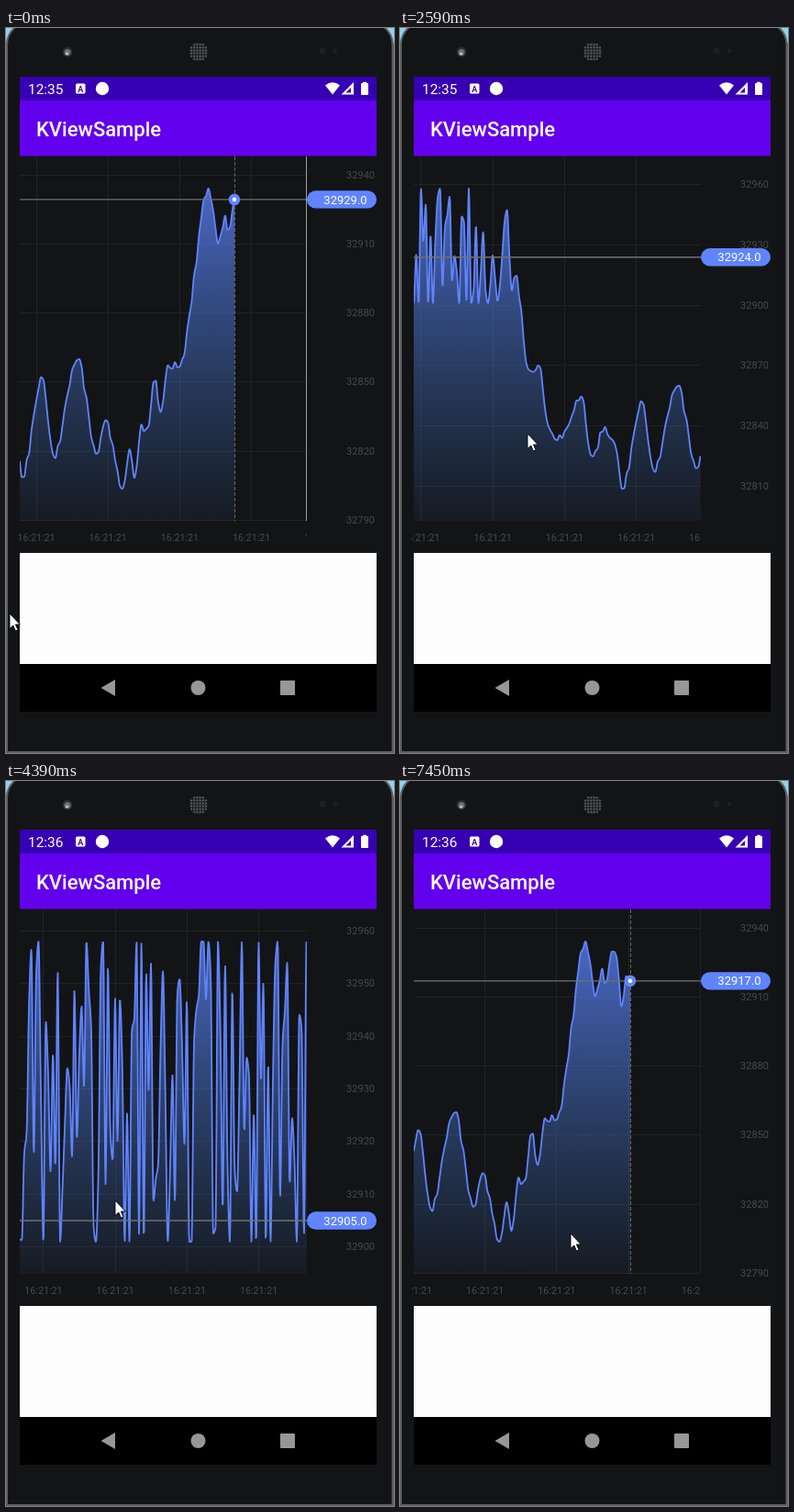
An HTML page with a canvas for the animation above (8 s loop, 423 px wide and 790 px high).

```html
<!DOCTYPE html>
<html lang="en">
<head>
<meta charset="utf-8">
<title>KViewSample</title>
<style>
  html, body { margin: 0; width: 100%; height: 100%; overflow: hidden; background: #131416; }
  canvas { display: block; }
</style>
</head>
<body>
<canvas id="stage" width="423" height="790"></canvas>
<script>
const ctx = document.getElementById('stage').getContext('2d');
const LOOP = 8000;
const BASE = 32800;
const STEP = 2.607;
const LABEL_GAP = 30 * STEP;
const LABEL_X = 33;
const plot = { left: 15, right: 328, top: 140, bottom: 537, pad: 35 };
const BLUE = '#6084ff';
const BODY = '#131416';

const clamp = (v, lo, hi) => Math.min(hi, Math.max(lo, v));
const smooth = (s) => s * s * (3 - 2 * s);

// Monotone cubic through [x, y] points; flat at every turning point.
function curve(points) {
  const slope = (i) => (points[i + 1][1] - points[i][1]) / (points[i + 1][0] - points[i][0]);
  const tangents = points.map((_, i) => {
    if (i === 0 || i === points.length - 1) return 0;
    const a = slope(i - 1), b = slope(i);
    return a * b <= 0 ? 0 : 2 * a * b / (a + b);
  });
  return (x) => {
    if (x <= points[0][0]) return points[0][1];
    const i = points.findIndex((p) => p[0] >= x) - 1;
    if (i < 0) return points[points.length - 1][1];
    const [x0, y0] = points[i], [x1, y1] = points[i + 1];
    const w = x1 - x0, s = (x - x0) / w, r = 1 - s;
    return y0 * r * r * (1 + 2 * s) + y1 * s * s * (3 - 2 * s)
      + w * s * r * (tangents[i] * r - tangents[i + 1] * s);
  };
}

let seed = 20;
const random = () => (seed = (seed * 16807) % 2147483647) / 2147483647;

// Main turns of the price above BASE; earlier prices swing at random.
const TREND_START = -122, TREND_END = 246;
const trend = curve([
  [-122, 118], [-118, 104], [-108, 149.5], [-103, 106], [-99, 115], [-83, 66], [-73, 71], [-64, 41],
  [-50, 34], [-27, 54], [-15, 23], [-3, 38], [12, 27], [18, 9], [39, 52.5], [52, 18], [78, 60.5],
  [99, 18], [108, 33], [128, 2.5], [134, 21], [141, 9], [147, 31], [155, 30], [162, 50], [169.5, 37],
  [175, 55], [190, 58], [207, 101], [217, 132], [221, 133], [232, 111], [239.5, 122], [242.5, 116],
  [250, 130], [253.5, 129], [255.8, 124], [258.1, 113], [260.4, 105], [265, 119], [269.5, 117]
]);
const prices = [];
for (let i = -250; i <= 91; i++) {
  const x = LABEL_X + i * STEP, r = random() - 0.5;
  const wobble = x < TREND_END ? 4 * r : 0;
  prices.push([x, x < TREND_START ? clamp(130 + 70 * r, 101, 158) : trend(x) + wobble]);
}
const priceAt = curve(prices);
const DATA_START = -618;
const samples = Array.from({ length: 1780 }, (_, i) => priceAt(DATA_START + i / 2));

// Drag gestures: time, chart scroll, pointer x, pointer y.
const gestures = [
  [110, 0, 4, 638], [750, 0, 175, 460], [1200, 0, 175, 458], [1580, 54, 229, 454],
  [2100, 224.5, 300, 448], [2590, 224.5, 139, 442], [3330, 606.5, 300, 445], [3690, 606.5, 235, 447],
  [4110, 606.5, 235, 450], [4390, 477.5, 119, 457], [5810, 141, 109, 477], [6700, -18.5, 186, 493]
];
const [scrollAt, pointerX, pointerY] = [1, 2, 3].map((k) => curve(gestures.map((g) => [g[0], g[k]])));

// The newest price glides forward at a steady beat.
function headAt(t) {
  const beat = 837, glide = 540, phase = Math.max(0, t - 210) / beat;
  const beats = Math.floor(phase);
  const ticks = beats + smooth(Math.min(1, (phase - beats) * beat / glide));
  return 249 + 2.28 * Math.min(9, ticks);
}

function box(x, y, w, h, color, radius = 0) {
  ctx.fillStyle = color;
  ctx.beginPath();
  ctx.roundRect(x, y, w, h, radius);
  ctx.fill();
}

function disc(x, y, r, color) {
  ctx.fillStyle = color;
  ctx.beginPath();
  ctx.arc(x, y, r, 0, Math.PI * 2);
  ctx.fill();
}

function shape(points, color) {
  ctx.fillStyle = color;
  ctx.beginPath();
  points.forEach(([x, y]) => ctx.lineTo(x, y));
  ctx.closePath();
  ctx.fill();
}

function line(x0, y0, x1, y1, color, { dash = [], width = 1 } = {}) {
  ctx.strokeStyle = color;
  ctx.lineWidth = width;
  ctx.setLineDash(dash);
  ctx.beginPath();
  ctx.moveTo(x0, y0);
  ctx.lineTo(x1, y1);
  ctx.stroke();
  ctx.setLineDash([]);
}

function text(value, x, y, size, color, align = 'left', weight = 400) {
  ctx.font = `${weight} ${size}px Roboto, sans-serif`;
  ctx.fillStyle = color;
  ctx.textAlign = align;
  ctx.fillText(value, x, y);
}

function drawPhone() {
  box(0, 0, 423, 790, '#6a6b6d');
  box(0, 0, 423, 16, '#8fd3ee');
  box(1, -6, 420.5, 795, BODY, [24, 24, 0, 0]);
  ctx.strokeStyle = '#5c5d5f';
  ctx.lineWidth = 2;
  ctx.stroke();

  disc(67, 26, 5.5, '#2b2c2f');
  disc(67, 26.5, 3.5, '#6d7078');
  disc(66.5, 28, 1.6, '#c3c6d0');
  disc(210, 26, 10, '#222325');
  for (let y = -8; y <= 8; y += 3.2) {
    for (let x = -8; x <= 8; x += 3.2) {
      if (Math.hypot(x, y) < 9.5) disc(210 + x, 26 + y, 1, '#626365');
    }
  }
  disc(345, 25, 3.5, '#1d1e20');
  disc(359, 25, 2.5, '#1d1e20');
}

function drawBars(t) {
  box(15, 53, 389, 26, '#3700b3');
  box(15, 79, 389, 60.5, '#6200ee');
  text(t < 3000 ? '12:35' : '12:36', 24, 72, 15.4, '#fff');
  box(76, 60.5, 10.5, 11, '#fff', 1.5);
  text('A', 81.3, 69.6, 9, '#3700b3', 'center', 700);
  disc(105, 66, 7.2, '#fff');

  ctx.fillStyle = '#fff';
  ctx.beginPath();
  ctx.moveTo(356, 72.5);
  ctx.lineTo(348, 62.5);
  ctx.quadraticCurveTo(356, 56, 364, 62.5);
  ctx.fill();
  shape([[379, 59], [379, 72.5], [365.5, 72.5]], '#fff');
  shape([[376, 65], [376, 70.5], [370.5, 70.5]], '#3700b3');
  box(387, 60, 8, 13, '#fff', 1);
  box(389, 58.8, 4, 2, '#fff');

  text('KViewSample', 33, 118, 22, '#fff', 'left', 500);
  box(15, 572, 389, 121, '#fdfdfd');
  box(15, 693, 389, 52, '#000');
  shape([[103.5, 719], [119, 710], [119, 728]], '#979797');
  disc(209.5, 719, 8, '#979797');
  box(299, 711, 16, 16, '#979797', 1);
}

function drawGrid(min, max, yOf, scroll) {
  const { left, right, top, bottom } = plot;
  const tick = Math.max(10, Math.round((max - min) / 50) * 10);
  for (let value = Math.ceil(max / 10) * 10; yOf(value) < bottom; value -= tick) {
    const y = Math.floor(yOf(value)) + 0.5;
    line(left, y, right, y, '#202224');
    text(String(BASE + value), 402, y + 3.5, 11, '#48494b', 'right');
  }

  ctx.save();
  ctx.beginPath();
  ctx.rect(13, top, right - 13, 430);
  ctx.clip();
  const first = ((LABEL_X + scroll) % LABEL_GAP + LABEL_GAP) % LABEL_GAP - LABEL_GAP;
  for (let x = first; x < right + 20; x += LABEL_GAP) {
    const gridX = Math.floor(x) + 0.5;
    if (gridX > left) line(gridX, top, gridX, bottom, '#212325');
    text('16:21:21', x, 558.5, 10.7, '#48494b', 'center');
  }
  ctx.restore();
}

function drawArea(points, end) {
  const { left, right, top, bottom } = plot;
  const trace = () => {
    ctx.beginPath();
    points.forEach(([x, y]) => ctx.lineTo(x, y));
  };
  const shade = ctx.createLinearGradient(0, top, 0, bottom);
  shade.addColorStop(0, 'rgba(96, 132, 255, 0.82)');
  shade.addColorStop(1, 'rgba(60, 115, 190, 0.08)');

  ctx.save();
  ctx.beginPath();
  ctx.rect(left, top, right - left, bottom - top);
  ctx.clip();
  trace();
  ctx.lineTo(end, bottom);
  ctx.lineTo(left, bottom);
  ctx.fillStyle = shade;
  ctx.fill();
  trace();
  ctx.strokeStyle = BLUE;
  ctx.lineWidth = 1.8;
  ctx.lineJoin = 'round';
  ctx.stroke();
  ctx.restore();
}

function drawChart(t) {
  const { left, right, top, bottom, pad } = plot;
  const scroll = scrollAt(t), head = headAt(t);
  const headX = head + scroll, quote = trend(head);
  const end = Math.min(headX, right);

  const visible = [];
  for (let x = left; x < end; x += 0.5) {
    visible.push([x, samples[Math.round((x - scroll - DATA_START) * 2)]]);
  }
  if (headX <= right) visible.push([headX, quote]);
  const values = visible.map(([, value]) => value);
  const min = Math.min(...values), max = Math.max(...values);
  const scale = (bottom - top - 2 * pad) / (max - min);
  const yOf = (value) => top + pad + (max - value) * scale;
  const quoteY = yOf(quote);

  drawGrid(min, max, yOf, scroll);
  drawArea(visible.map(([x, value]) => [x, yOf(value)]), end);

  line(left, quoteY, right, quoteY, '#707173', { width: 1.4 });
  if (headX <= right) {
    const ruleX = Math.floor(headX) + 0.5;
    line(ruleX, top, ruleX, bottom, '#66676a', { dash: [4, 2] });
    disc(headX, quoteY, 6.3, BLUE);
    disc(headX, quoteY, 2.3, '#fff');
  }
  if (t < 110) line(327.5, top, 327.5, bottom, '#a0a1a2');

  box(328, quoteY - 9.7, 76, 19.4, BLUE, 9.7);
  text((BASE + Math.round(quote)).toFixed(1), 370, quoteY + 4.6, 13, '#fff', 'center');
}

function drawPointer(x, y) {
  ctx.save();
  ctx.translate(x, y);
  shape([[0, 0], [0, 16.5], [3.8, 13], [6.4, 19], [9, 17.8], [6.4, 12], [11.3, 12]], '#fff');
  ctx.strokeStyle = '#000';
  ctx.lineWidth = 0.9;
  ctx.stroke();
  ctx.restore();
}

const start = performance.now();
function loop() {
  const t = (performance.now() - start) % LOOP;
  drawPhone();
  drawBars(t);
  drawChart(t);
  drawPointer(pointerX(t), pointerY(t));
  requestAnimationFrame(loop);
}
loop();
</script>
</body>
</html>
```
